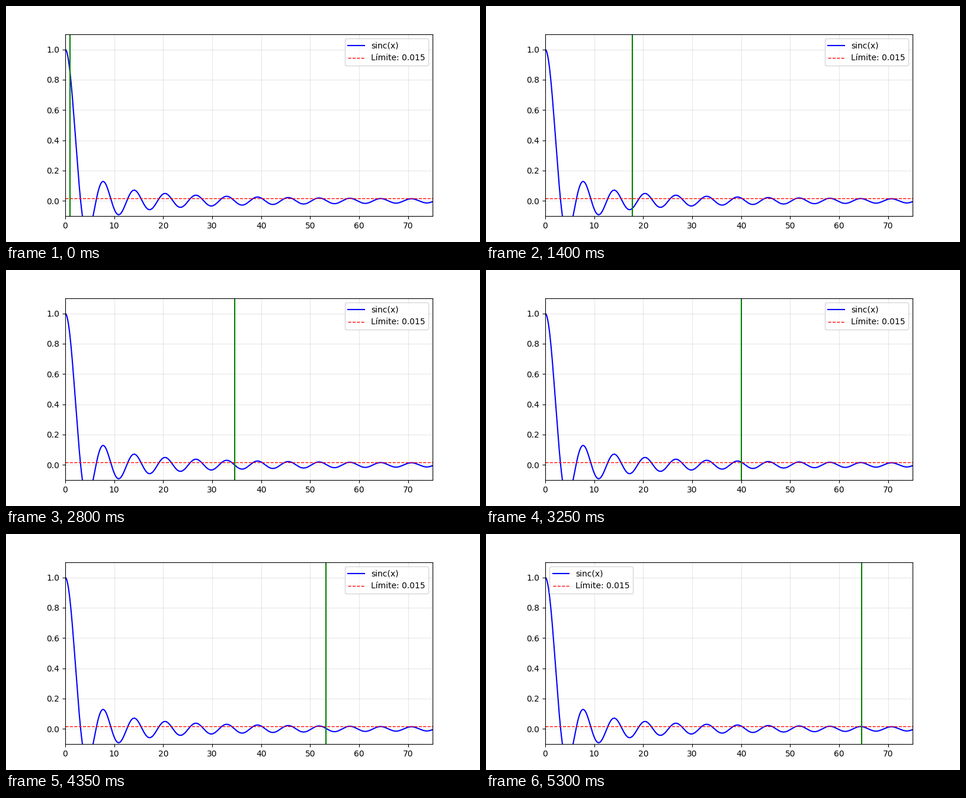
These frames come from a looping animation (800 px wide and 400 px high, 5350 ms). A matplotlib script:

```python
import numpy as np
import matplotlib.pyplot as plt
from matplotlib.animation import FuncAnimation

FRAMES, INTERVAL = 107, 50
X_MAX, LIMIT = 75, 0.015
START, STEP = 1.0, 0.6

fig, ax = plt.subplots(figsize=(8, 4), dpi=100)

x = np.linspace(0, X_MAX, 1000)
ax.plot(x, np.sinc(x / np.pi), color="blue", lw=1.5, label="sinc(x)")
ax.axhline(LIMIT, color="red", ls="--", lw=1, label=f"Límite: {LIMIT}")
cursor = ax.axvline(START, color="green", lw=1.5)

ax.set_xlim(0, X_MAX)
ax.set_ylim(-0.1, 1.1)
ax.grid(alpha=0.3)
# "best" moves the legend to the left once the cursor reaches it
ax.legend(loc="best")


def update(i):
    pos = START + STEP * i
    cursor.set_xdata([pos, pos])
    return (cursor,)


anim = FuncAnimation(fig, update, frames=FRAMES, interval=INTERVAL,
                     repeat=True, repeat_delay=0, blit=False)
plt.show()
```
